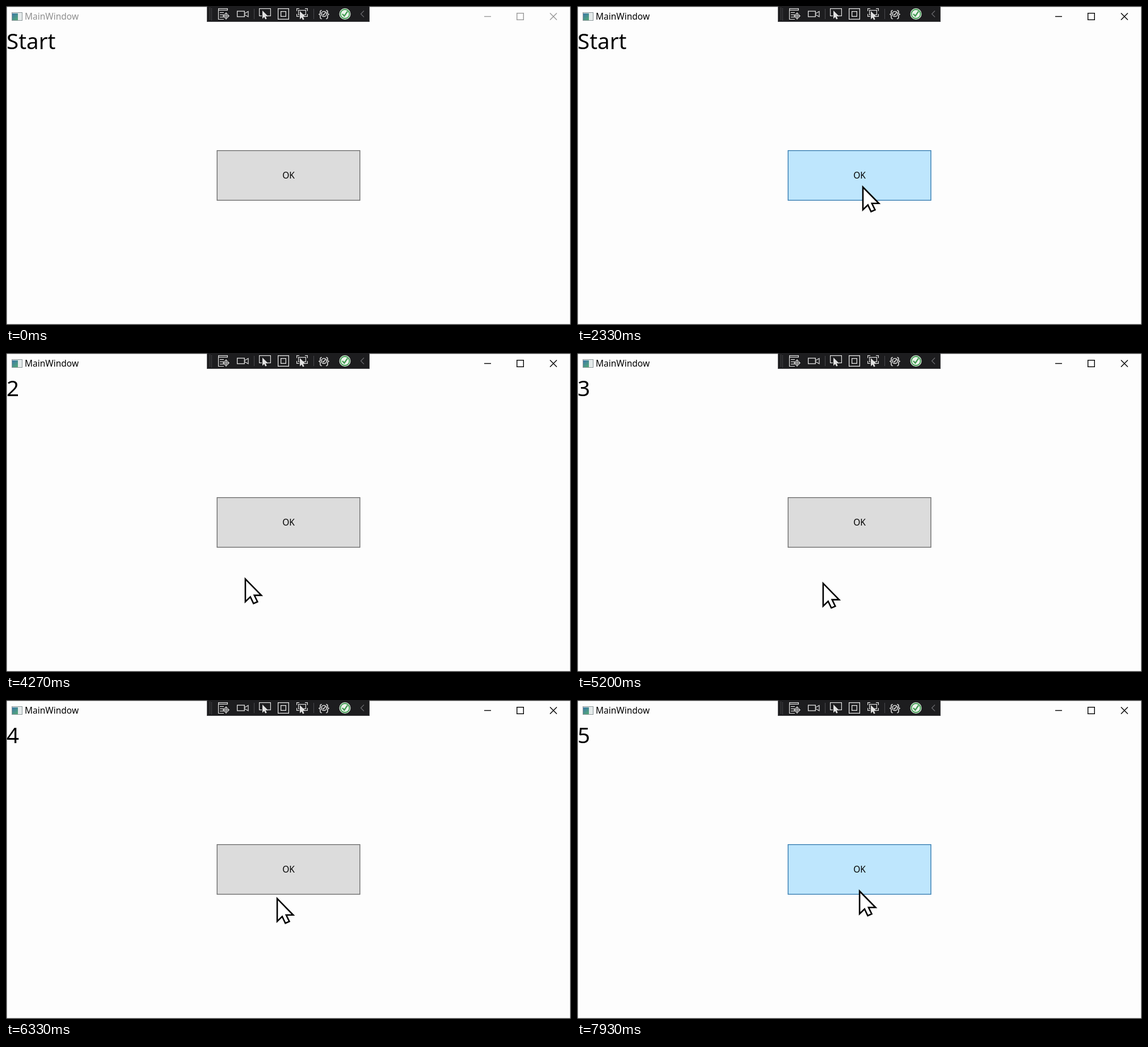
Recreate the animation shown at these times as an HTML page with a canvas. Size 996 px wide and 562 px high, loop 8000 ms.

```html
<!DOCTYPE html>
<html lang="en">
<head>
<meta charset="utf-8">
<title>Window with a button</title>
<style>
  html, body { margin: 0; width: 100%; height: 100%; overflow: hidden; background: #fdfdfd; }
  canvas { display: block; }
</style>
</head>
<body>
<canvas id="stage" width="996" height="562"></canvas>
<script>
const ctx = document.getElementById('stage').getContext('2d');
const LOOP = 8000, STEP = 1000 / 15;
const ENTER = 600, ARRIVE = 1400, ACTIVATE = 1500, RELEASE = 1860;
const FIRST_TICK = 2925, TICK = 1010, LAST_COUNT = 5;
const BUTTON = { x: 371.5, y: 254, w: 253, h: 89 };
const HOME = { x: 503, y: 317 }, OUTSIDE = { x: 285, y: 590 };

// The pointer leaves the button and comes back around each of these moments.
const dips = [
  { at: 4235, fall: 560, rise: 467, x: 420, y: 397 },
  { at: 5170, fall: 467, rise: 415, x: 432, y: 405 },
  { at: 6000, fall: 415, rise: 582, x: 436, y: 397 },
  { at: 7165, fall: 582, rise: 1050, x: 468, y: 423 }
];

const mix = (a, b, p) => ({ x: a.x + (b.x - a.x) * p, y: a.y + (b.y - a.y) * p });

function pointerAt(t) {
  if (t < ENTER) return null;
  if (t < ARRIVE) return mix(OUTSIDE, HOME, Math.sin((t - ENTER) / (ARRIVE - ENTER) * Math.PI / 2));
  const dip = dips.find(d => t >= d.at - d.fall && t < d.at + d.rise);
  if (!dip) return HOME;
  const away = (t - dip.at) / (t < dip.at ? dip.fall : dip.rise);
  return mix(HOME, dip, (1 + Math.cos(away * Math.PI)) / 2);
}

function rect(x, y, w, h, fill) {
  ctx.fillStyle = fill;
  ctx.fillRect(x, y, w, h);
}

function box(x, y, w, h, color, width = 1.2) {
  ctx.strokeStyle = color;
  ctx.lineWidth = width;
  ctx.strokeRect(x + width / 2, y + width / 2, w - width, h - width);
}

function line(color, width, ...coords) {
  ctx.beginPath();
  for (let i = 0; i < coords.length; i += 2) ctx.lineTo(coords[i], coords[i + 1]);
  ctx.strokeStyle = color;
  ctx.lineWidth = width;
  ctx.stroke();
}

function ring(x, y, r, color, width) {
  ctx.beginPath();
  ctx.arc(x, y, r, 0, Math.PI * 2);
  ctx.strokeStyle = color;
  ctx.lineWidth = width;
  ctx.stroke();
}

function text(str, x, y, size, color, align = 'left') {
  ctx.font = `${size}px "Noto Sans", sans-serif`;
  ctx.textAlign = align;
  ctx.fillStyle = color;
  ctx.fillText(str, x, y);
}

function check(x, y, size, color, width) {
  line(color, width, x - size, y, x - size / 4, y + size * 0.8, x + size, y - size);
}

const ARROW = [[0, 0], [0, 40], [8.8, 31.5], [14.4, 43.3], [21.4, 40.2], [15.8, 28.8], [28.2, 28.8]];

function arrow(x, y, scale, fill, edge) {
  ctx.beginPath();
  for (const [ax, ay] of ARROW) ctx.lineTo(x + ax * scale, y + ay * scale);
  ctx.closePath();
  ctx.fillStyle = fill;
  ctx.fill();
  ctx.strokeStyle = edge;
  ctx.lineWidth = 2.6;
  if (edge) ctx.stroke();
}

function drawFrame(active) {
  const ink = active ? '#000' : '#999';
  rect(0, 0, 996, 562, '#fdfdfd');
  box(0, 0, 996, 562, '#2b2b2b', 1.4);

  const pane = ctx.createLinearGradient(11, 13, 20, 25);
  pane.addColorStop(0, '#3b78a8');
  pane.addColorStop(1, '#55a878');
  rect(10, 11, 19, 15, '#e4eaea');
  rect(11, 13, 10, 12, pane);
  box(10, 11, 19, 15, '#8c9699', 1);

  text('MainWindow', 33, 24, 15.5, active ? '#000' : '#8f8f8f');
  line(ink, 1.4, 843, 18.5, 855, 18.5);
  box(900, 12, 13, 13, ink, 1.4);
  for (const side of [-6, 6]) line(ink, 1.4, 965 - side, 12.5, 965 + side, 24.5);
}

function drawToolbar() {
  const light = '#e2e2e2', dark = '#1d1d1f';
  rect(354, 0, 287, 28, dark);
  box(354, -1, 287, 29, '#454548', 1);
  for (let i = 0; i < 22; i++) rect(359 + i % 2 * 3, 3 + i, 1, 1, '#66666a');
  for (const x of [437, 542]) rect(x, 5, 1, 18, '#48484c');

  // List with a crosshair
  box(374, 4, 17, 4, light);
  line(light, 1.2, 374.5, 7, 374.5, 23.5, 384, 23.5);
  for (let y = 11.5; y < 20; y += 4) line(light, 1.2, 377, y, 384, y);
  ring(388, 17.5, 3.8, light, 1.3);
  line(light, 1.2, 388, 11, 388, 24);
  line(light, 1.2, 382, 17.5, 394, 17.5);

  // Camera
  box(407, 8.5, 14, 11, light, 1.3);
  line(light, 1.2, 421, 13, 427, 9.5, 427, 19, 421, 15.5);

  // Screen with a pointer
  box(446, 4, 21, 14, light);
  rect(451, 8, 9, 11, dark);
  arrow(452, 8, 0.36, light);

  // Nested squares
  for (const r of [10, 5]) box(489 - r, 14 - r, 2 * r, 2 * r, light, 1.3);

  // Framed screen with a pointer
  box(512, 4, 20, 15, light);
  rect(517, 3, 10, 17, dark);
  rect(511, 9, 22, 5, dark);
  box(515, 7, 14, 9, light);
  rect(517, 9, 6, 9, dark);
  arrow(518, 9, 0.36, light);

  // Check in braces
  text('{', 554, 20, 18, light, 'center');
  text('}', 567, 20, 18, light, 'center');
  ring(560.5, 14, 4.6, light, 1.5);
  check(560.5, 14, 2.5, light, 1.4);

  // Green check
  ctx.beginPath();
  ctx.arc(597.5, 14, 10, 0, Math.PI * 2);
  ctx.fillStyle = '#e9f3e9';
  ctx.fill();
  ring(597.5, 14, 8, '#3f9a50', 1.8);
  check(597.5, 14, 4.6, '#3f9a50', 2.3);

  line('#6a6a6e', 1.2, 631, 8.5, 625.5, 14, 631, 19.5);
}

function drawButton(hover, pressed) {
  const { x, y, w, h } = BUTTON;
  const [fill, edge] = pressed ? ['#c4e5f6', '#2c628b']
    : hover ? ['#bee6fd', '#3c7fb1'] : ['#dcdcdc', '#707070'];
  rect(x, y, w, h, fill);
  box(x, y, w, h, edge, 1.4);
  text('OK', x + w / 2, 304, 15.5, '#000', 'center');
}

function render(ms) {
  const t = Math.floor((ms % LOOP + 4) / STEP) * STEP;
  const pointer = pointerAt(t);
  const hover = pointer && pointer.y < BUTTON.y + BUTTON.h;
  const count = Math.min(LAST_COUNT, Math.floor((t - FIRST_TICK) / TICK) + 1);

  drawFrame(t >= ACTIVATE);
  drawToolbar();
  text(count > 0 ? count : 'Start', 1, 76, 38.5, '#000');
  drawButton(hover, t >= ACTIVATE && t < RELEASE);
  if (pointer) arrow(pointer.x + 1, pointer.y + 2, 1, '#fff', '#000');
}

const start = performance.now();
function loop() {
  render(performance.now() - start);
  requestAnimationFrame(loop);
}
loop();
</script>
</body>
</html>
```
